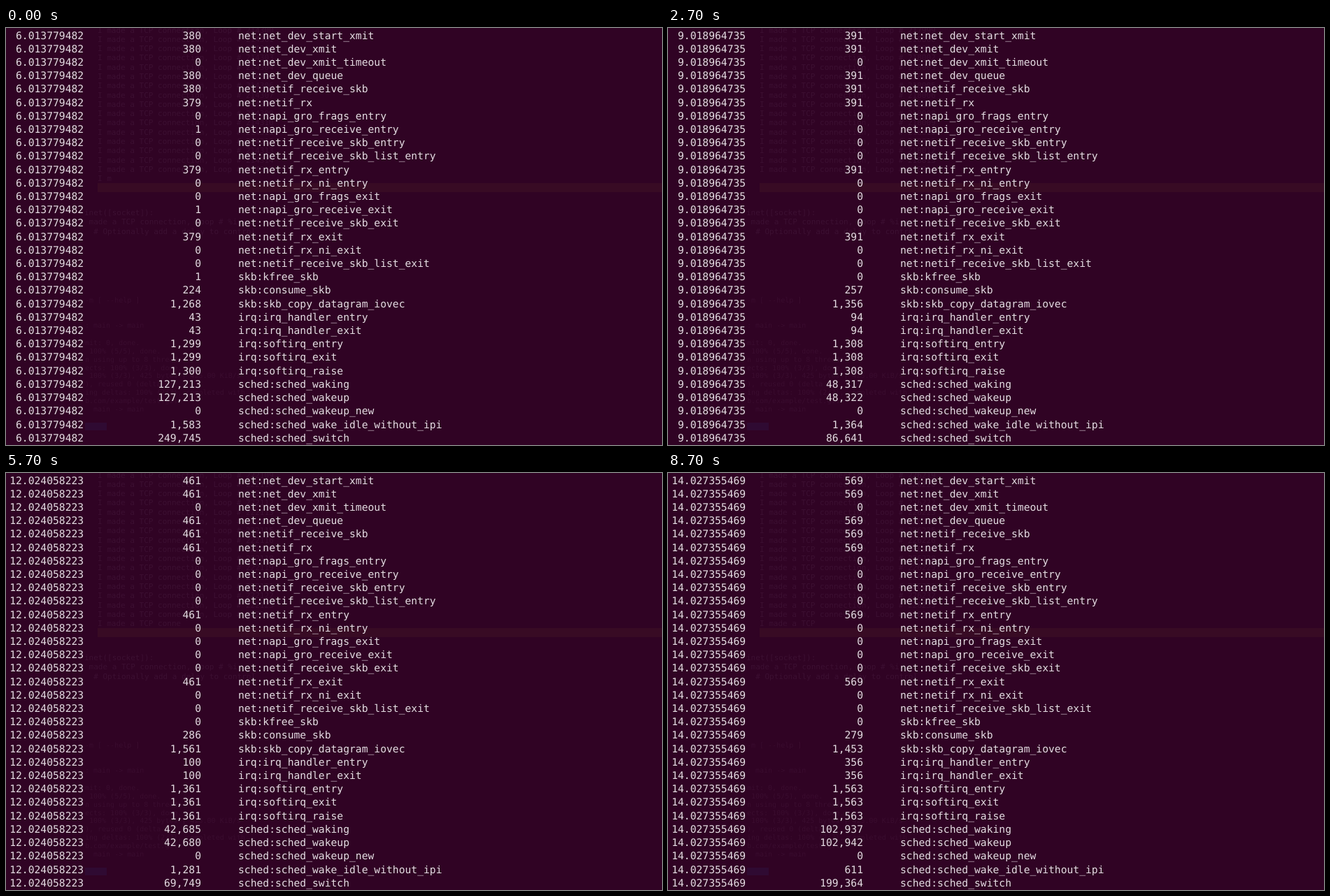
Recreate the animation shown at these times as an HTML page. Size 938x597 px, loop 8800 ms.

```html
<!DOCTYPE html>
<html lang="en">
<head>
<meta charset="utf-8">
<title>Event counters</title>
<style>
  html, body { margin: 0; width: 100%; height: 100%; overflow: hidden; background: #300324; }
  pre {
    position: absolute; margin: 0; white-space: pre;
    font-family: "DejaVu Sans Mono", monospace;
    text-rendering: geometricPrecision;
  }
  #stats { left: 5.2px; top: -17.6px; font-size: 14.68px; line-height: 19.2px; color: #e4dde2; }
  .ghost { font-size: 11px; line-height: 13.3px; color: #3c1032; }
  #log { left: 131px; top: -3.5px; }
  .small { font-size: 10px; line-height: 11.85px; color: #3a0d2f; }
  .bar { position: absolute; left: 131px; right: 0; top: 222px; height: 13px; background: #380b24; }
  .mark { position: absolute; left: 113px; top: 565px; width: 31px; height: 11px; background: #2f0a32; }
</style>
</head>
<body>
<div class="bar"></div>
<div class="mark"></div>
<pre class="ghost" id="log"></pre>
<pre class="ghost" style="left:112px;top:258px">inet([socket]):
 made a TCP connection, Loop # %i
  # Optionally add a delay to control</pre>
<pre class="small" style="left:113px;top:385px">-m [ --help ]


: main -> main</pre>
<pre class="small" style="left:113px;top:446px">mit: 0, done.
 100% (5/5), done.
n using up to 8 threads
ects: 100% (3/3), done.
 100% (3/3), 425 bytes | 425.00 KiB/s
), reused 0 (delta 0)
ing deltas: 100% (2/2), completed with
b.com/example/test.git
  main -> main</pre>
<pre id="stats"></pre>
<script>
const LOOP = 8800;
const names = `net:net_dev_start_xmit net:net_dev_xmit net:net_dev_xmit_timeout net:net_dev_queue
net:netif_receive_skb net:netif_rx net:napi_gro_frags_entry net:napi_gro_receive_entry
net:netif_receive_skb_entry net:netif_receive_skb_list_entry net:netif_rx_entry
net:netif_rx_ni_entry net:napi_gro_frags_exit net:napi_gro_receive_exit
net:netif_receive_skb_exit net:netif_rx_exit net:netif_rx_ni_exit
net:netif_receive_skb_list_exit skb:kfree_skb skb:consume_skb skb:skb_copy_datagram_iovec
irq:irq_handler_entry irq:irq_handler_exit irq:softirq_entry irq:softirq_exit
irq:softirq_raise sched:sched_waking sched:sched_wakeup sched:sched_wakeup_new
sched:sched_wake_idle_without_ipi sched:sched_switch`.split(/\s+/);

// start ms, stamp, sent, consumed, copied, irqs, softirqs, waking, wakeup, idle, switches, gro
const samples = [
  [0, "6.013779482", 380, 224, 1268, 43, 1299, 127213, 127213, 1583, 249745, 1],
  [600, "7.015528316", 395, 236, 1342, 51, 1276, 96428, 96431, 1567, 183352, 0],
  [1700, "8.017258047", 416, 248, 1417, 56, 1249, 63492, 63496, 1591, 115706, 0],
  [2700, "9.018964735", 391, 257, 1356, 94, 1308, 48317, 48322, 1364, 86641, 0],
  [3700, "10.020725420", 367, 266, 1295, 148, 1351, 33163, 33157, 1136, 57592, 0],
  [4700, "11.022614704", 368, 247, 1286, 92, 1335, 34248, 34257, 881, 59920, 0],
  [5700, "12.024058223", 461, 286, 1561, 100, 1361, 42685, 42680, 1281, 69749, 0],
  [6700, "13.025897662", 388, 254, 1338, 55, 1321, 131098, 131097, 857, 257197, 0],
  [7700, "14.027355469", 569, 279, 1453, 356, 1563, 102937, 102942, 611, 199364, 0]
];

function statsText([, stamp, sent, consumed, copied, irqs, soft, waking, wakeup, idle, switches, gro]) {
  const rx = sent - gro;
  const counts = [sent, sent, 0, sent, sent, rx, 0, gro, 0, 0, rx, 0, 0, gro, 0, rx, 0, 0, gro,
    consumed, copied, irqs, irqs, soft, soft, soft + gro, waking, wakeup, 0, idle, switches];
  const rows = names.map((name, i) =>
    stamp.padStart(12) + counts[i].toLocaleString("en-US").padStart(19) + "      " + name);
  return " ".repeat(37) + "qdisc:qdisc_dequeue\n" + rows.join("\n");
}

// Faint log behind the table: the last line is caught while being written.
function logText(tick) {
  const line = n => "I made a TCP connection, Loop # " + n;
  const first = 214300 + tick * 137;
  const rows = Array.from({ length: 16 }, (_, i) => line(first + i));
  rows.push(line(first + 16).slice(0, (tick * 7 + 3) % 24));
  return rows.join("\n");
}

const stats = document.getElementById("stats");
const log = document.getElementById("log");
const pages = samples.map(statsText);
let shownPage = -1, shownTick = -1;

function draw(now) {
  const t = now % LOOP;
  const page = samples.filter(s => s[0] <= t).length - 1;
  const tick = Math.floor(t / 100);
  if (page !== shownPage) stats.textContent = pages[shownPage = page];
  if (tick !== shownTick) log.textContent = logText(shownTick = tick);
  requestAnimationFrame(draw);
}
draw(0);
</script>
</body>
</html>
```
